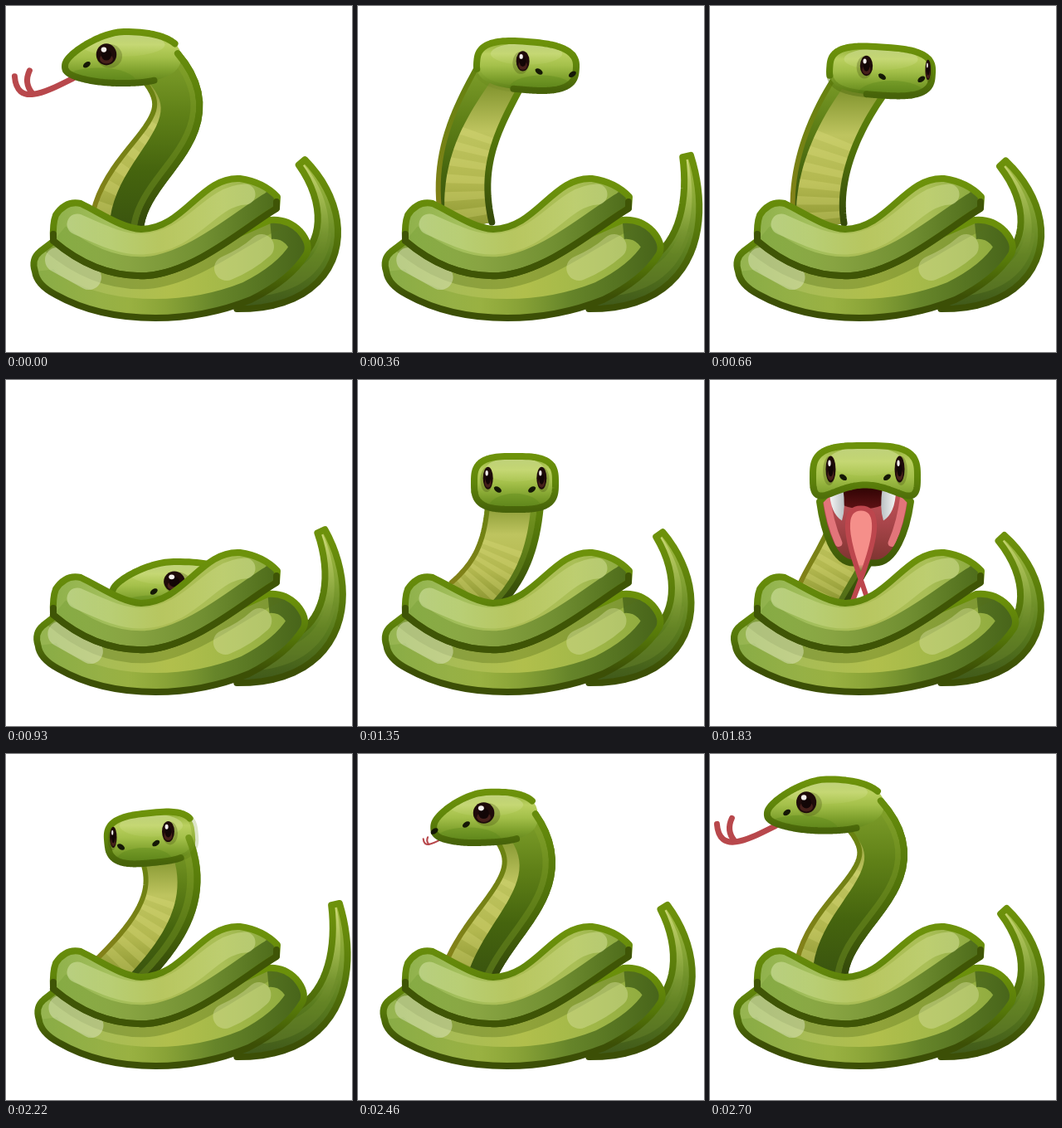
Write an HTML page with a canvas that moves like this. It is 417 px wide and 417 px high and loops after 2730 ms.

```html
<!DOCTYPE html>
<html lang="en">
<head>
<meta charset="utf-8">
<title>Snake</title>
<style>
html, body { margin: 0; width: 100%; height: 100%; overflow: hidden; background: #fff; }
canvas { display: block; }
</style>
</head>
<body>
<canvas id="stage" width="417" height="417"></canvas>
<script>
const LOOP = 2730, STEP = 30, LINE = 8;
const g = document.getElementById('stage').getContext('2d');
const { sin, cos, abs, min, max, PI } = Math;
const clamp = v => max(0, min(1, v));
const lerp = (a, b, u) => a + (b - a) * u;

// x y w h: head box; a b: neck handles; tip: tail swing, 0 bent to 1 upright
const side = { x: 141, y: 62, w: 70, h: 31, yaw: -1.01, tilt: 0, open: 0, ax: 250, ay: 150, bx: 140, by: 185, tip: .1 };
const right = { x: 203, y: 72, w: 60, h: 29, yaw: .64, tilt: .08, open: 0, ax: 140, ay: 140, bx: 115, by: 190, tip: .98 };
const peek = { x: 200, y: 248, w: 72, h: 29, yaw: -.68, tilt: 0, open: 0, ax: 190, ay: 285, bx: 155, by: 290, tip: .62 };
const front = { x: 189, y: 124, w: 49, h: 32, yaw: 0, tilt: 0, open: 0, ax: 186, ay: 200, bx: 170, by: 235, tip: .25 };
const bite = { x: 187, y: 117, w: 63, h: 38, yaw: 0, tilt: 0, open: 1, ax: 182, ay: 195, bx: 145, by: 232, tip: -.02 };
const left = { x: 175, y: 101, w: 53, h: 30, yaw: -.31, tilt: -.1, open: 0, ax: 215, ay: 170, bx: 185, by: 215, tip: 1 };

const keys = [
  [0, side], [360, right], [600, { ...right, x: 207, y: 46, ay: 115, tip: -.1 }],
  [860, { ...peek, y: 253, tip: .9 }], [930, peek], [1080, { ...peek, x: 194, y: 264, tip: -.1 }],
  [1350, front], [1620, { ...front, y: 100, ay: 178, tip: 1 }],
  [1740, { ...bite, y: 113, tip: .3 }], [1830, bite], [1980, { ...bite, y: 120, tip: .4 }],
  [2220, left], [2620, { ...side, tip: -.05 }]
];

// cyclic Hermite blend of the four nearest keys
function poseAt(t) {
  const n = keys.length, i = keys.findLastIndex(k => k[0] <= t);
  const key = j => keys[(j + n) % n];
  const time = j => key(j)[0] + LOOP * Math.floor(j / n);
  const d = time(i + 1) - time(i), s = (t - time(i)) / d, q = 1 - s;
  const a = .7 * d / (time(i + 1) - time(i - 1)) * s * q * q;
  const b = -.7 * d / (time(i + 2) - time(i)) * s * s * q;
  const w = s * s * (3 - 2 * s);
  const weights = [-a, 1 - w - b, w + a, b], out = {};
  for (const k in side) out[k] = weights.reduce((v, c, j) => v + c * key(i - 1 + j)[1][k], 0);
  return out;
}

// ---- drawing helpers
function shade(x0, y0, x1, y1, ...colors) {
  const s = g.createLinearGradient(x0, y0, x1, y1);
  colors.forEach((c, i) => s.addColorStop(i / (colors.length - 1), c));
  return s;
}
const down = (a, b, ...c) => shade(0, a, 0, b, ...c);
const across = (a, b, ...c) => shade(a, 0, b, 0, ...c);
const shape = p => typeof p === 'string' ? new Path2D(p) : p;
function fill(p, c) { g.fillStyle = c; g.fill(shape(p)); }
function stroke(p, c, w = LINE, cap = 'round') {
  g.lineCap = cap;
  g.strokeStyle = c;
  g.lineWidth = w;
  g.stroke(shape(p));
}
function inside(p, paint) { g.save(); g.clip(shape(p)); paint(); g.restore(); }
function at(x, y, sx, sy, paint) {
  g.save();
  g.translate(x, y);
  g.scale(sx, sy);
  paint();
  g.restore();
}
function line(points) {
  const p = new Path2D();
  points.forEach(v => p.lineTo(...v));
  return p;
}
function oval(x, y, rx, ry, c, rot = 0) {
  const p = new Path2D();
  p.ellipse(x, y, rx, ry, rot, 0, 2 * PI);
  fill(p, c);
}
const range = (a, b, n = 24) => Array.from({ length: n + 1 }, (_, i) => lerp(a, b, i / n));

// a tapered tube: spot(u, f) runs along it by u and across it by f from -1 to 1
function tube(a, b, c, d, w0, w1) {
  return (u, f) => {
    const q = 1 - u;
    const pos = k => q * q * q * a[k] + 3 * q * q * u * b[k] + 3 * q * u * u * c[k] + u * u * u * d[k];
    const dir = k => q * q * (b[k] - a[k]) + 2 * q * u * (c[k] - b[k]) + u * u * (d[k] - c[k]);
    const dx = dir(0), dy = dir(1), r = f * lerp(w0, w1, u) / Math.hypot(dx, dy);
    return [pos(0) + dy * r, pos(1) - dx * r];
  };
}
function strip(spot, lo, hi, u0 = 0, u1 = 1) {
  const us = range(u0, u1);
  return line([...us.map(u => spot(u, lo(u))), ...us.reverse().map(u => spot(u, hi(u)))]);
}
const edge = (spot, f) => line(range(0, 1).map(u => spot(u, f)));

// ---- parts
function drawTail({ tip }) {
  const x = 352 + 45 * tip, y = 181 + .0045 * (397 - x) ** 2;
  const spot = tube([280, 340], [395, 348], [413, 255], [x, y], 25, 5);
  const all = strip(spot, () => -1, () => 1);
  fill(all, down(180, 362, '#a9c044', '#84a334', '#5a7c1e', '#40591a'));
  fill(strip(spot, () => -.1, () => .8, .45, 1), down(190, 300, 'rgba(214,224,135,.7)', 'rgba(150,175,70,0)'));
  fill(strip(spot, () => -.4, () => .5, 0, .6), 'rgba(120,145,50,.3)');
  stroke(all, down(190, 350, '#6d910b', '#57790b', '#3c4f06'));
}

function neckOf(p) {
  const top = [p.x - 54 * sin(p.yaw), p.y + 12];
  return tube(top, [p.ax, p.ay], [p.bx, p.by], [132, 267], 24 + 8 * cos(p.yaw) ** 2, 30);
}
const neckEdge = y => down(y, 268, '#668c0c', '#50720a', '#33470a');
function drawNeck(p, spot) {
  const y = p.y;
  fill(strip(spot, () => -1, () => 1), down(y, 268, '#7f9f2b', '#5f8017', '#45640e', '#3a540f'));
  fill(strip(spot, () => .6, () => 1), 'rgba(140,170,45,.3)');
  // belly turns with the head: 0 is the left edge, 1 the right
  const from = clamp(p.yaw * .65), to = clamp(.82 + p.yaw * .75);
  const lo = u => 2 * from * (1 - .85 * u) - 1;
  const hi = u => 2 * lerp(to, .85, .4 * u) - 1;
  fill(strip(spot, lo, hi), down(y + 20, 270, '#7f922c', '#bec45f', '#b3b850', '#8a9430'));
  for (let u = .4; u < .9; u += .1) fill(strip(spot, lo, hi, u, u + .05), 'rgba(228,226,130,.25)');
  stroke(edge(spot, -1), down(y, 260, '#62820f', '#87811a'), 6);
  stroke(edge(spot, 1), neckEdge(y));
}

// head surface: X and Y from -1 to 1, with a snout slope seen from the side
// and an arched lip when the mouth opens
function headOf(p) {
  const slope = .7 * clamp((-p.yaw - .3) / .35), c = cos(p.tilt), s = sin(p.tilt);
  return (X, Y) => {
    const snout = slope * (1 - Y) / 2 * max(0, -X) ** 1.5;
    const lip = .75 * clamp(p.open) * ((Y + 1) / 2) ** 2 * (1 - X * X);
    const x = X * p.w, y = (Y + snout - lip) * p.h;
    return [p.x + x * c - y * s, p.y + x * s + y * c];
  };
}
function outline(p, warp, a, b) {
  const power = 2 / (2 + 1.2 * cos(p.yaw) ** 2);
  const round = v => Math.sign(v) * abs(v) ** power;
  return line(range(a, b, 48).map(k => warp(round(cos(2 * PI * k)), round(sin(2 * PI * k)))));
}

function drawTongue(t, x, y) {
  const out = max(clamp(1 - t / 210), clamp((t - 2400) / 200));
  if (!out) return;
  at(x, y, out, out, () => {
    stroke('M2 0C-30 16 -66 36 -69 -2', '#b8484c', 7);
    stroke('M-48 18Q-58 6 -51 -9', '#b8484c', 7);
  });
}

function drawMouth(p, warp) {
  const open = clamp(p.open);
  if (open < .03) return;
  at(...warp(0, 1), p.w / 63, open, () => {
    const jaw = 'M-55 20C-50 56 -38 94 -14 94L12 94C36 94 50 56 55 20Q0 -40 -55 20Z';
    fill(jaw, down(0, 94, '#c9565b', '#a8454a', '#7d332f'));
    inside(jaw, () => {
      for (const s of [-1, 1]) stroke(`M${s * 47} 12Q${s * 43} 45 ${s * 32} 70`, '#e2757a', 9);
      fill('M-28 -10H22V24Q-3 34 -28 24Z', down(0, 28, '#2a0202', '#5d1214'));
    });
    stroke(jaw, down(20, 94, '#5a8009', '#3f5908'));
    for (const s of [-1, 1]) {
      at(-3, 0, s, 1, () => fill('M24 2Q20 28 25 43Q39 34 40 8Z', across(22, 40, '#b9c0c2', '#f5f6f6')));
    }
    const tongue = 'M5 145C-4 115 -23 70 -21 46Q-20 28 -5 28Q10 28 11 46C13 70 -6 115 -17 145';
    fill(tongue, down(96, 106, '#f58f8a', 'rgba(245,143,138,0)'));
    stroke(tongue, '#bd464d', 6);
  });
}

function drawHead(p, warp) {
  const { x, y, w, h, yaw } = p, top = y - h, base = y + h;
  const all = outline(p, warp, 0, 1), turn = abs(sin(yaw));
  fill(all, down(top, base, '#8fad36', '#bad05f', '#a4c04a', '#80a22e', '#5f8219'));
  inside(all, () => {
    oval(x, y - h * .5, w * .72, h * .46, down(top, y, 'rgba(230,238,180,.6)', 'rgba(205,220,130,.1)'));
    oval(x + w * sin(yaw) * .5, y + h * .95, w * .65, h * .55, 'rgba(88,132,25,.35)');
  });

  // the outline fades where the head runs into the neck
  const ink = down(top, base, '#6d920a', '#5f850a', '#47630a');
  const parts = [[.47, .92, 1], [.92, 1.17, 1 + 2.5 * yaw], [.17, .27, 1], [.27, .47, 1 - 1.4 * yaw]];
  for (const [a, b, alpha] of parts) {
    g.globalAlpha = clamp(alpha);
    stroke(outline(p, warp, a, b), ink);
  }
  g.globalAlpha = 1;

  for (const s of [-1, 1]) {
    const X = sin(yaw) + s * .42 * cos(yaw);
    if (abs(X) < 1) oval(...warp(X, .25 * cos(yaw)), 5, 3, '#151806', yaw < -.6 ? -.6 : s * -.6);

    const face = cos(yaw + s * .72);
    if (face < .3) continue;
    const [ex, ey] = warp(sin(yaw + s * .72), -.18);
    const rx = 8 * face * (1 + .6 * clamp((-yaw - .3) / .35)), ry = .42 * h;
    oval(ex + s * rx * .3, ey + 2, rx * 1.25, ry * 1.1, 'rgba(70,80,15,.3)');
    oval(ex, ey, rx, ry, '#1e0b0a');
    oval(ex, ey + ry * .4, rx * .65, ry * .45, '#46201b');
    oval(ex, ey + ry * .05, rx * .5, ry * .5, '#120606');
    oval(ex - rx * .25, ey - ry * .45, rx * .27, ry * .24, '#f4efec');
  }
}

// each coil is a back edge closed by a front edge
function coil({ back, front, start, skin, rim, ink, gloss }) {
  const all = back + front + 'Z';
  fill(all, skin);
  inside(all, () => {
    stroke(start + front, rim, 46, 'butt');
    gloss();
  });
  stroke(all, ink);
}
const upperFront = 'C290 265 230 320 170 325Q110 328 57 283';
function drawLower(t) {
  at(199, 0, 1 - .029 * sin(t / LOOP * 8 * PI), 1, () => at(-199, 0, 1, 1, () => coil({
    back: 'M200 310L62 280L41 296Q30 305 35 320',
    start: 'M35 320',
    front: 'Q37 336 60 348Q110 376 180 376Q240 376 295 354Q343 330 362 299Q368 287 354 271Q339 256 318 258',
    skin: across(34, 364, '#94b450', '#a8bc55', '#b1bf4c', '#a0b748', '#8ba83c'),
    rim: across(40, 360, 'rgba(120,160,55,.4)', 'rgba(135,165,50,.5)', '#66852a', '#48651a'),
    ink: down(265, 350, '#6b900a', '#567909', '#3c4f06'),
    gloss() {
      stroke('M334 250' + upperFront, 'rgba(85,110,25,.35)', 32);
      stroke('M62 306L100 327', 'rgba(222,230,190,.5)', 30);
      stroke('M308 290Q290 306 266 316', 'rgba(220,228,165,.4)', 30);
    }
  })));
}
function drawUpper() {
  coil({
    back: 'M57 283Q56 262 60 252Q72 234 90 238C115 250 140 268 163 269C215 268 235 205 282 208Q310 212 327 230L326 244',
    start: 'M334 238L326 244',
    front: upperFront,
    skin: across(55, 330, '#8eb04a', '#a3bf5c', '#adbd54', '#aabf57', '#86a53a'),
    rim: across(57, 328, 'rgba(125,165,60,.5)', '#88a442', '#718f32', '#4d6b1a'),
    ink: down(212, 320, '#6d920b', '#60850a', '#3f5506'),
    gloss: () => stroke('M86 263C115 276 140 288 165 287C225 284 245 229 288 227',
      across(70, 300, 'rgba(222,235,180,.5)', 'rgba(215,225,130,.25)', 'rgba(222,232,165,.45)'), 25)
  });
  stroke('M57 283V275M57 283Q110 328 170 325C230 320 290 265 326 244V236', '#3f5506');
}

function draw(t) {
  const p = poseAt(t), warp = headOf(p), neck = neckOf(p);
  g.clearRect(0, 0, 417, 417);
  g.lineJoin = 'round';
  drawTail(p);
  drawNeck(p, neck);
  drawTongue(t, ...warp(-.88, .72));
  drawMouth(p, warp);
  drawHead(p, warp);
  g.globalAlpha = clamp(-2.5 * p.yaw);
  stroke(edge(neck, 1), neckEdge(p.y));
  g.globalAlpha = 1;
  drawLower(t);
  drawUpper();
}

const start = performance.now();
function tick() {
  const t = (performance.now() - start) % LOOP;
  draw(Math.floor(t / STEP) * STEP);
  requestAnimationFrame(tick);
}
tick();
</script>
</body>
</html>
```
